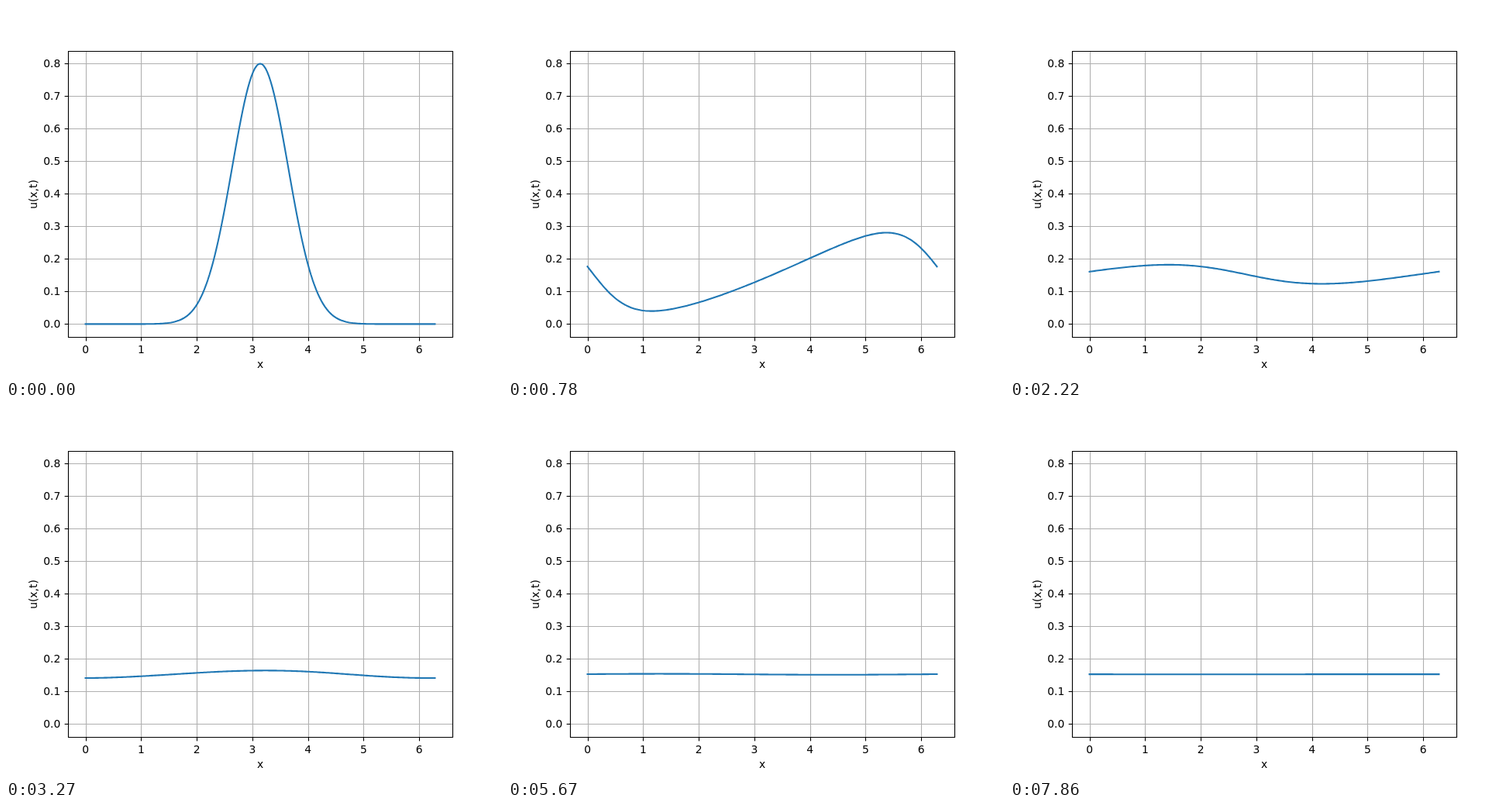
An HTML page that plays this animation: 640x480 px, repeating every 8000 ms.

```html
<!DOCTYPE html>
<html lang="en">
<head>
<meta charset="utf-8">
<title>u(x,t)</title>
<style>
  html, body { margin: 0; width: 100%; height: 100%; overflow: hidden; background: #fff; }
  svg { display: block; width: 640px; height: 480px; }
  text { font: 13.89px "DejaVu Sans", sans-serif; fill: #000; }
  .grid, .axis { fill: none; stroke-width: 1.11; }
  .grid { stroke: #b0b0b0; }
  .axis { stroke: #000; }
  #curve {
    fill: none; stroke: #1f77b4; stroke-width: 2.083;
    stroke-linecap: square; stroke-linejoin: round;
  }
</style>
</head>
<body>
<svg viewBox="0 0 640 480">
  <g id="grid"></g>
  <path id="curve"/>
  <g id="axes"></g>
</svg>
<script>
const LOOP = 8000, STEP = 30, LAST = 262;

// Plot area and data scales
const LEFT = 80.5, RIGHT = 576.5, TOP = 58.5, BOTTOM = 427.5, TICK = 4.86;
const X0 = 102.545, Y0 = 410.4, SX = 71.764, SY = 421.11;
const px = x => X0 + x * SX;
const py = u => Y0 - u * SY;
const snap = v => Math.floor(v + 0.5) + 0.5;

const byId = id => document.getElementById(id);

function add(parent, tag, attrs, label) {
  const el = document.createElementNS("http://www.w3.org/2000/svg", tag);
  for (const key in attrs) el.setAttribute(key, attrs[key]);
  if (label) el.textContent = label;
  byId(parent).appendChild(el);
}

const line = (parent, cls, d) => add(parent, "path", { class: cls, d });
const label = (x, y, anchor, str, extra) =>
  add("axes", "text", { x, y, "text-anchor": anchor, ...extra }, str);

function drawAxes() {
  for (let k = 0; k <= 6; k++) {
    const x = snap(px(k));
    line("grid", "grid", `M${x} ${TOP}V${BOTTOM}`);
    line("axes", "axis", `M${x} ${BOTTOM}v${TICK}`);
    label(px(k), 448, "middle", String(k));
  }
  for (let k = 0; k <= 8; k++) {
    const y = snap(py(k / 10));
    line("grid", "grid", `M${LEFT} ${y}H${RIGHT}`);
    line("axes", "axis", `M${LEFT} ${y}h${-TICK}`);
    label(70.3, y + 4.5, "end", (k / 10).toFixed(1));
  }
  line("axes", "axis", `M${LEFT} ${TOP}H${RIGHT}V${BOTTOM}H${LEFT}Z`);
  label(328, 467, "middle", "x");
  label(0, 0, "middle", "u(x,t)", { transform: "translate(40 243) rotate(-90)" });
}

// Viscous Burgers equation on a ring: upwind advection, central diffusion
const N = 200, NU = 0.07, SUBSTEPS = 164;
const DX = 2 * Math.PI / N, DT = DX * NU;

function solve() {
  let u = new Float64Array(N), next = new Float64Array(N);
  for (let i = 0; i < N; i++) {
    const s = (i * DX - Math.PI) / 0.5;
    u[i] = Math.exp(-s * s / 2) / (0.5 * Math.sqrt(2 * Math.PI));
  }
  const a = DT / DX, b = NU * DT / (DX * DX);
  const states = [u.slice()];
  while (states.length <= LAST) {
    for (let n = 0; n < SUBSTEPS; n++) {
      for (let i = 0; i < N; i++) {
        const c = u[i], l = u[i ? i - 1 : N - 1], r = u[i < N - 1 ? i + 1 : 0];
        next[i] = c - a * c * (c - l) + b * (r - 2 * c + l);
      }
      [u, next] = [next, u];
    }
    states.push(u.slice());
  }
  return states;
}

function curvePath(u) {
  let d = "";
  for (let i = 0; i <= N; i++) {
    d += (i ? "L" : "M") + px(i * DX).toFixed(2) + " " + py(u[i % N]).toFixed(3);
  }
  return d;
}

drawAxes();
const states = solve();
const curve = byId("curve");
const start = performance.now();
let shown = -1;

function show(now) {
  const t = Math.max(0, now - start) % LOOP;
  const k = Math.min(LAST, Math.floor(t / STEP));
  if (k !== shown) {
    shown = k;
    curve.setAttribute("d", curvePath(states[k]));
  }
  requestAnimationFrame(show);
}
show(start);
</script>
</body>
</html>
```
